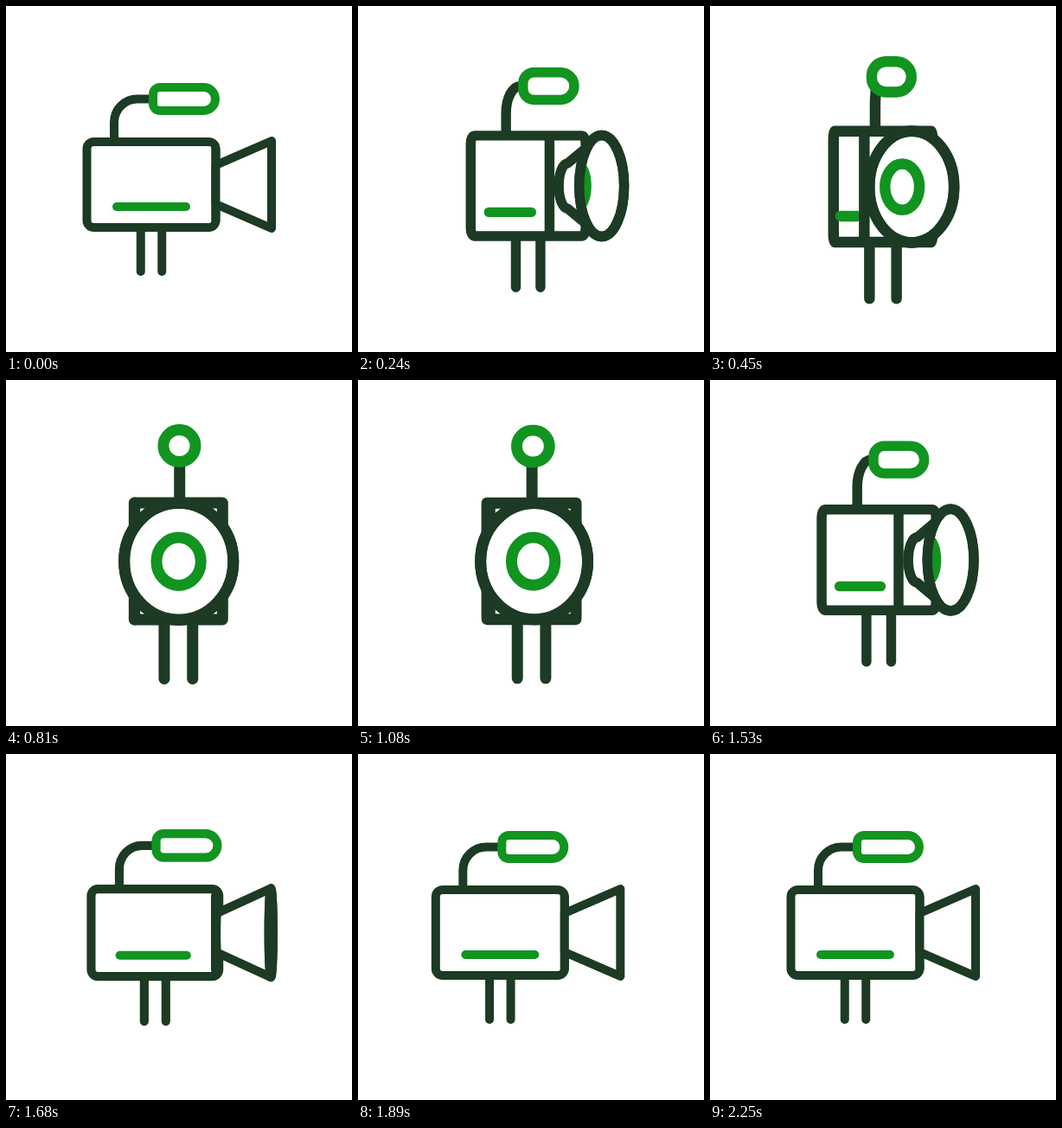
An HTML page for the animation above (2.28 s loop, 400 px wide and 400 px high).

```html
<!DOCTYPE html>
<html lang="en">
<head>
<meta charset="utf-8">
<title>Turning camera</title>
<style>
  html, body { margin: 0; width: 100%; height: 100%; overflow: hidden; background: #fff; }
  svg { display: block; width: 100vw; height: 100vh; }
  .dark { stroke: #1c3a24; }
  .green { stroke: #129420; }
  .open { fill: none; }
</style>
</head>
<body>
<svg viewBox="0 0 400 400" fill="#fff" stroke-linecap="round" stroke-linejoin="round">
  <defs><clipPath id="glass"><ellipse id="hole"/></clipPath></defs>
  <g id="camera">
    <path id="arm" class="dark open"/>
    <path id="mic" class="green"/>
    <path id="legs" class="dark open"/>
    <rect id="body" class="dark"/>
    <path id="label" class="green open"/>
    <path id="edge" class="dark open"/>
    <path id="cone" class="dark"/>
    <ellipse id="lens" class="dark"/>
    <g clip-path="url(#glass)"><ellipse id="ring" class="green open"/></g>
    <ellipse id="rim" class="dark open"/>
  </g>
</svg>
<script>
const LOOP = 2280, STEP = 30;
const el = id => document.getElementById(id);
const set = (id, attrs) => {
  for (const k in attrs) el(id).setAttribute(k, attrs[k]);
};

// Share of the time span that has passed, 0 to 1.
const part = (t, from, to) => Math.min(1, Math.max(0, (t - from) / (to - from)));

// One swing out and back; skew below 1 peaks early, above 1 late.
const hump = (t, from, to, skew) => Math.sin(Math.PI * part(t, from, to) ** skew);

// 0 is the side view, 1 the front view.
function turn(t) {
  const rise = 1 - (1 - part(t, 0, 930) ** 1.3) ** 3.4;
  const fall = 1 - part(t, 870, 1695) ** 3;
  return Math.min(rise, fall);
}

// Centre of the body: follows the turn, swings right on both ways, then settles.
const centre = t => 168 + 31.4 * turn(t)
  + 14 * hump(t, 0, 570, .7)
  + 13 * hump(t, 980, 1710, 1.6)
  - 3.9 * hump(t, 1710, 2250, .45);

function draw(t) {
  const p = turn(t), x = centre(t);
  const s = 1 + .34 * p, side = s * (1 - p), front = s * p;
  el('camera').setAttribute('stroke-width', 10 + 3 * p);

  // body: side face, then front face
  const half = (149 * side + 76 * front) / 2;
  const x0 = x - half, x1 = x0 + 149 * side, x2 = x + half;
  const y0 = 157 - 15 * p, y1 = 256 + 21 * p, r = 8 * (1 - p);
  set('body', { x: x0, y: y0, width: x2 - x0, height: y1 - y0, rx: r, ry: 8 * s });
  set('edge', { d: `M${x1} ${y0 + r}V${y1 - r}` });

  const mid = (x0 + x1) / 2, bar = 40 * side;
  set('label', {
    d: `M${mid - bar} ${232 + 13.5 * p}h${2 * bar}`,
    visibility: p > .95 ? 'hidden' : 'visible'
  });

  const gap = 12.25 * s, foot = 307 + 38.5 * p;
  set('legs', { d: `M${x - gap} ${y1}V${foot}M${x + gap} ${y1}V${foot}` });

  // microphone and its arm
  const mx = x + 38 * side + p, my = 107.5 - 31.5 * p;
  const mw = 36 * side + 13.8 * front, mh = 13.5 + 5 * p;
  const a = Math.min(mh, (8 + 5.8 * p) * s);
  const left = mx - mw, right = mx + mw;
  set('mic', {
    d: `M${left + a} ${my - mh}H${right - mh}A${mh} ${mh} 0 0 1 ${right - mh} ${my + mh}` +
       `H${left + a}A${a} ${a} 0 0 1 ${left} ${my + mh - a}V${my - mh + a}` +
       `A${a} ${a} 0 0 1 ${left + a} ${my - mh}Z`
  });
  const ax = x - 43 * side + 1.5 * p, bend = 27 * side, rise = 27 * s;
  set('arm', {
    d: `M${ax} ${y0}V${my + rise}A${bend} ${rise} 0 0 1 ${ax + bend} ${my}` +
       `H${Math.max(left, ax + bend)}`
  });

  // cone, lens and inner ring
  const cy = 206.5 + 3.2 * p;
  const lx = x + 139 * side, lw = 47.2 * front, lh = 50.5 + 17 * p;
  const bx = (x1 + x2) / 2, bw = 18.5 * front, bh = 22.5 * s;
  set('cone', {
    d: `M${lx} ${cy - lh}L${bx} ${cy - bh}A${bw} ${bh} 0 0 0 ${bx} ${cy + bh}L${lx} ${cy + lh}Z`
  });
  const oval = { cx: lx, cy, rx: lw, ry: lh };
  for (const id of ['lens', 'rim', 'hole']) set(id, oval);
  set('ring', { cx: x + 93 * side, cy, rx: 19.2 * front, ry: 22 + 5.7 * p });
}

function tick() {
  const t = performance.now() % LOOP;
  draw(Math.floor(t / STEP) * STEP);
  requestAnimationFrame(tick);
}
tick();
</script>
</body>
</html>
```
